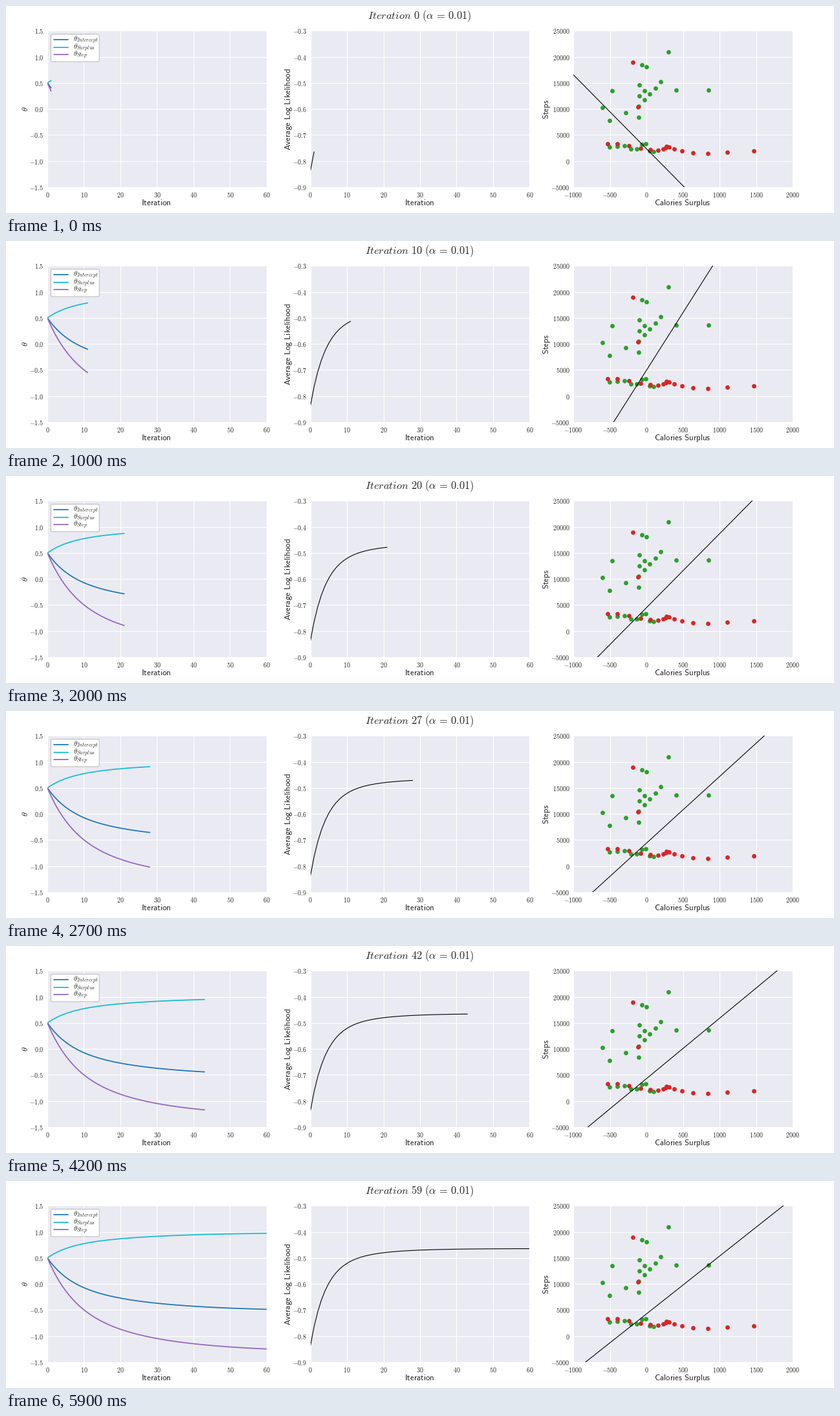
A matplotlib script that plays this animation: 1280 px wide and 320 px high, repeating every 6 s.

```python
import numpy as np
import matplotlib.pyplot as plt
from matplotlib.animation import FuncAnimation
from matplotlib.lines import Line2D
from matplotlib.patches import FancyBboxPatch
from matplotlib.transforms import Affine2D

W, H, DPI = 1280, 320, 80
STEPS, ALPHA = 60, 0.01
INK = "0.15"
RED, GREEN = "#d62728", "#2ca02c"

plt.rcParams.update({
    "mathtext.fontset": "cm",
    "text.color": INK,
    "axes.labelcolor": INK,
    "lines.solid_capstyle": "round",
})


def active_days():
    """Days with many steps, and a small wavy band of quiet ones."""
    row = np.linspace((-466, 13500), (849, 13640), 4)
    column = np.linspace((-100, 14600), (-105, 8400), 4)
    slope = np.linspace((198, 15180), (-28, 11820), 4)
    single = [(304, 20950), (-67, 18470), (3, 18090),
              (-607, 10270), (-506, 7760), (-284, 9240)]
    i = np.arange(9)
    v = i / 4 - 1
    band = np.column_stack([
        -138 + 300 * v - 70 * v**2,
        2700 + 150 * i * np.cos(np.pi / 2 * (i - 5.5)),
    ])
    return np.vstack([row, column, slope, single, band])


def idle_days():
    """A band that thins out towards both ends, and two busy days."""
    i = np.arange(16)
    u = i / 7.5 - 1
    band = np.column_stack([
        270 + 1000 * u * abs(u) + 200 * u**6,
        2350 - 550 * u + 500 * np.cos(np.pi / 4 * (i - 0.5)),
    ])
    return np.vstack([band, [(-191, 18930), (-116, 10420)]])


def coefficient(t, limit, slow, rate):
    """Fast and slow decay from 0.5 to the limit."""
    fast = 0.5 - limit - slow
    return limit + slow * np.exp(-0.043 * t) + fast * np.exp(-rate * t)


def likelihood(t):
    return -0.464 - 0.087 * np.exp(-0.09 * t) - 0.286 * np.exp(-0.259 * t)


def sans(text):
    return r"$\mathsf{" + text.replace(" ", r"\ ") + "}$"


def setup(ax, xticks, yticks, fmt, xlabel, ylabel, ylabel_gap):
    ax.set_facecolor("#EAEAF2")
    ax.set_axisbelow(True)
    ax.grid(color="white", lw=1)
    for spine in ax.spines.values():
        spine.set_visible(False)
    ax.set_xlim(xticks[0], xticks[-1])
    ax.set_ylim(yticks[0], yticks[-1])
    ax.set_xticks(xticks, [f"${v:.0f}$" for v in xticks])
    ax.set_yticks(yticks, [f"${v:{fmt}}$" for v in yticks])
    ax.tick_params(length=0, pad=5, labelsize=9, labelcolor=INK)
    ax.set_xlabel(xlabel, fontsize=11.7, va="baseline")
    ax.set_ylabel(ylabel, fontsize=11.7, va="baseline")
    box = ax.get_position()
    ax.xaxis.set_label_coords(0.497, -28.2 / (box.height * H))
    ax.yaxis.set_label_coords(-ylabel_gap / (box.width * W), 0.5)


def draw_legend(names, colors):
    fig.add_artist(FancyBboxPatch(
        (69.4, 43.6), 74.8, 42.4, boxstyle="round,pad=0,rounding_size=2.2",
        fc="white", ec="0.75", lw=1, transform=pixels))
    for i, (name, color) in enumerate(zip(names, colors)):
        y = 51.9 + 11.7 * i
        fig.add_artist(Line2D([74.2, 95.6], [y, y], color=color, lw=1.6,
                              transform=pixels))
        fig.text(103.5, y + 3.2, rf"$\theta_{{{name}}}$", fontsize=10,
                 va="baseline", transform=pixels)


fig, (ax_theta, ax_score, ax_days) = plt.subplots(
    1, 3, figsize=(W / DPI, H / DPI), dpi=DPI, facecolor="white")
fig.subplots_adjust(left=0.05, right=0.95, bottom=0.125, top=0.88, wspace=0.2)
pixels = Affine2D().scale(1 / W, -1 / H).translate(0, 1) + fig.transFigure

rounds = np.arange(0, 61, 10)
setup(ax_theta, rounds, np.linspace(-1.5, 1.5, 7), ".1f",
      sans("Iteration"), r"$\theta$", 30)
setup(ax_score, rounds, np.linspace(-0.9, -0.3, 7), ".1f",
      sans("Iteration"), sans("Average Log Likelihood"), 31)
setup(ax_days, np.arange(-1000, 2001, 500), np.arange(-5000, 25001, 5000),
      ".0f", sans("Calories Surplus"), sans("Steps"), 38)

t = np.arange(STEPS + 1)
theta = np.array([
    coefficient(t, -0.53, 0.572, 0.167),
    coefficient(t, 0.995, -0.286, 0.18),
    coefficient(t, -1.32, 0.953, 0.145),
])
score = likelihood(t)

colors = ["#1f77b4", "#17becf", "#9467bd"]
curves = [ax_theta.plot([], [], color=c, lw=1.6)[0] for c in colors]
score_line, = ax_score.plot([], [], color="black", lw=1)
for days, color in ((active_days(), GREEN), (idle_days(), RED)):
    ax_days.scatter(*days.T, s=38, lw=0, color=color, zorder=2)
border, = ax_days.plot([], [], color="black", lw=1, zorder=3)
draw_legend(["Intercept", "Surplus", "Step"], colors)
title = fig.text(639.5, 19.8, "", fontsize=14.8, ha="center", va="baseline",
                 transform=pixels)

# Mean and spread that turn standard scores into raw units
surplus_mean, surplus_std = 68.4, 418.7
steps_mean, steps_std = 7331, 5943
surplus = np.array([-1000, 2000])


def update(k):
    title.set_text(rf"$Iteration\ {k}\ (\alpha\,=\,{ALPHA})$")
    seen = slice(k + 2)
    for curve, values in zip(curves, theta):
        curve.set_data(t[seen], values[seen])
    score_line.set_data(t[seen], score[seen])
    # Decision boundary a + b x + c y = 0
    a, b, c = theta[:, k]
    z = -(a + b * (surplus - surplus_mean) / surplus_std) / c
    border.set_data(surplus, steps_mean + steps_std * z)
    return [title, *curves, score_line, border]


anim = FuncAnimation(fig, update, frames=STEPS, interval=100, repeat=True)
plt.show()
```
